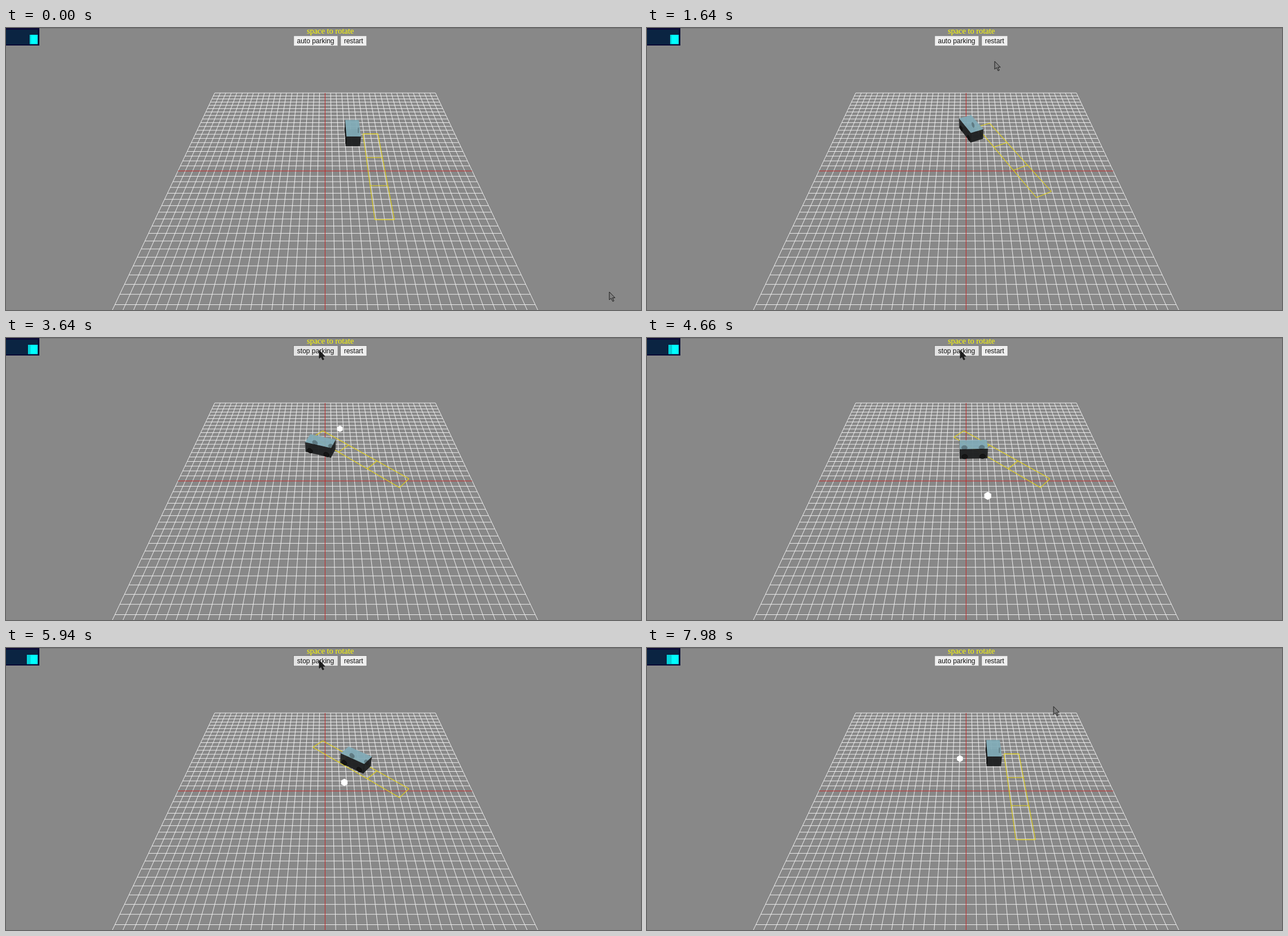
An HTML page that plays this animation: 1123 by 499 pixels, repeating every 8000 ms.

```html
<!DOCTYPE html>
<html lang="en">
<head>
<meta charset="utf-8">
<title>Parking simulation</title>
<style>
html, body { margin: 0; width: 100%; height: 100%; overflow: hidden; background: #888; }
svg { display: block; width: 100%; height: 100%; }
.title { font: 14.4px "Liberation Serif", "Times New Roman", serif; fill: #ff0; }
.label { font: 12px "Liberation Sans", Arial, sans-serif; fill: #111; }
.title, .label { text-anchor: middle; }
</style>
</head>
<body>
<svg viewBox="0 0 1123 499">
  <rect width="1123" height="499" fill="#888"/>
  <rect width="1123" height="1" fill="#747474"/>
  <path id="grid" fill="none" stroke="#eee"/>
  <path id="axes" fill="none" stroke="#c62424"/>
  <path id="slots" fill="none" stroke="#e6d414" stroke-width="1.1"/>
  <g id="car">
    <path id="floor" fill="#222" opacity=".6"/>
    <path id="sides" fill="#202223" stroke="#161616" stroke-width=".5" opacity=".93"/>
    <path id="roof" fill="#80abb7" opacity=".93"/>
    <path id="farWheels" fill="#111" stroke="#111" opacity=".3"/>
    <path id="nearWheels" fill="#141414" stroke="#0a0a0a" opacity=".9"/>
  </g>
  <path id="ball" fill="#fff"/>
  <rect width="59" height="31" fill="#0a0a35"/>
  <rect y="3" width="56" height="26" fill="#0b2442"/>
  <rect id="bars" y="12" height="16.5" fill="#0ff"/>
  <path id="stripes" stroke="#0b6f86" opacity=".6"/>
  <text class="title" x="573.5" y="10">space to rotate</text>
  <rect id="parkBox" stroke="#777"/>
  <text id="parkText" class="label" x="547.5" y="27.3"></text>
  <rect id="restartBox" stroke="#777"/>
  <text class="label" x="614.7" y="27.3">restart</text>
  <path id="cursor" d="M0 0V14L3.2 11.2L6 16.8L8.2 15.8L5.6 10.4H10Z" stroke="#1c1c1c" stroke-linejoin="round"/>
</svg>
<script>
const $ = id => document.getElementById(id);
const LOOP = 8000, RAD = Math.PI / 180, DIAG = Math.SQRT1_2;
const sin = deg => Math.sin(deg * RAD), cos = deg => Math.cos(deg * RAD);
const clamp = (v, lo = 0, hi = 1) => Math.min(hi, Math.max(lo, v));
const span = (t, from, to) => clamp((t - from) / (to - from));

// Camera at (0, 30, 30) looking at the origin
const depth = (y, z) => 42.43 - (y + z) * DIAG;
function project(x, y, z) {
  const k = 552 / depth(y, z);
  return [564.3 + x * k, 253 - (y - z) * DIAG * k];
}
const join = pts => "M" + pts.map(p => p.map(v => v.toFixed(2)).join(" ")).join("L");
const line = (x1, z1, x2, z2) => join([project(x1, 0, z1), project(x2, 0, z2)]);

function drawGrid() {
  let grid = "";
  for (let i = -20; i <= 20; i++) {
    if (i) grid += line(i, -20, i, 20) + line(-20, i, 20, i);
  }
  $("grid").setAttribute("d", grid);
  $("axes").setAttribute("d", line(0, -20, 0, 20) + line(-20, 0, 20, 0));
}

function drawSlots(turn) {
  const at = (x, z) => [x * cos(turn) + z * sin(turn), z * cos(turn) - x * sin(turn)];
  const seg = (a, b, c, d) => line(...at(a, b), ...at(c, d));
  let d = seg(5.85, -8.1, 5.85, 8.1) + seg(8.15, -8.1, 8.15, 8.1);
  for (const z of [-8.1, -2.7, 2.7, 8.1]) d += seg(5.85, z, 8.15, z);
  $("slots").setAttribute("d", d);
}

// Rear axle position and direction of reverse travel
const AXLE = 1.4, RADIUS = 5, SWEEP = 44.5, TURN = 47;
function startPose(turn) {
  const a = -60.1 - 0.95 * turn, dir = 90 - turn;
  return { x: 8.22 * cos(a) + AXLE * cos(dir), z: 8.22 * sin(a) + AXLE * sin(dir), dir };
}
const pivot = (p, r) => [p.x - r * sin(p.dir), p.z + r * cos(p.dir)];
function drive(p, r, angle) {
  const [cx, cz] = pivot(p, r), dir = p.dir + Math.sign(r) * angle;
  return { x: cx + r * sin(dir), z: cz - r * cos(dir), dir };
}
function carPose(t, turn) {
  let p = startPose(turn);
  if (turn < TURN) return p;
  p = drive(p, -RADIUS, SWEEP * span(t, 3075, 4165));
  return drive(p, RADIUS, SWEEP * span(t, 5000, 6090));
}

function drawCar(p) {
  const W = 1.03, L = 2, H = 1.86;
  const cx = p.x - AXLE * cos(p.dir), cz = p.z - AXLE * sin(p.dir);
  const ground = (a, b) => [cx + a * cos(p.dir) - b * sin(p.dir), cz + a * sin(p.dir) + b * cos(p.dir)];
  const pt = (a, b, y) => { const [x, z] = ground(a, b); return project(x, y, z); };
  const seen = (a, b) => {
    const [x, z] = ground(a, b);
    return (x - cx) * -x + (z - cz) * (30 - z) > 0;
  };
  const slab = y => join([pt(-L, -W, y), pt(L, -W, y), pt(L, W, y), pt(-L, W, y)]) + "Z";
  const wall = (a1, b1, a2, b2) =>
    join([pt(a1, b1, 0.08), pt(a2, b2, 0.08), pt(a2, b2, H), pt(a1, b1, H)]) + "Z";
  let sides = "", near = "", far = "";
  for (const s of [-1, 1]) {
    if (seen(s * L, 0)) sides += wall(s * L, -W, s * L, W);
    const open = seen(0, s * W);
    if (open) sides += wall(-L, s * W, L, s * W);
    for (const a of [-1.3, 1.3]) {
      const rim = Array.from({ length: 16 }, (_, i) =>
        pt(a + 0.42 * cos(i * 22.5), s * W, 0.44 + 0.42 * sin(i * 22.5)));
      if (open) near += join(rim) + "Z"; else far += join(rim) + "Z";
    }
  }
  $("floor").setAttribute("d", slab(0.1));
  $("sides").setAttribute("d", sides);
  $("roof").setAttribute("d", slab(H));
  $("nearWheels").setAttribute("d", near);
  $("farWheels").setAttribute("d", far);
}

// White marker on the turning centre; it lies at infinity while the wheels are straight
function drawBall(t, pose) {
  const rate = 0.00062;
  const bend = t < 4165 ? -clamp((t - 2535) * rate, 0, 0.2) : clamp((t - 4165) * rate - 0.2, -0.2, 0.2);
  let d = "";
  if (Math.abs(bend) > 0.032) {
    const [x, z] = pivot(pose, 1 / bend);
    if (depth(1, z) > 5) {
      const [sx, sy] = project(x, 1, z), r = 276 / depth(1, z);
      d = join(Array.from({ length: 6 }, (_, i) => [sx + r * sin(i * 60), sy - r * cos(i * 60)])) + "Z";
    }
  }
  $("ball").setAttribute("d", d);
}

// time, x, y
const PATH = [
  [60, 1067, 467], [360, 960, 358], [430, 971, 369], [860, 971, 369], [1640, 615, 59],
  [2280, 554, 22], [6400, 554, 22], [7080, 624, 28], [7240, 624, 28], [7980, 719, 103.5]
];
function cursorAt(t) {
  const i = PATH.findIndex(k => k[0] >= t);
  if (i === 0) return PATH[0].slice(1);
  if (i < 0) return PATH[PATH.length - 1].slice(1);
  const [t0, x0, y0] = PATH[i - 1], [t1, x1, y1] = PATH[i], u = span(t, t0, t1);
  return [x0 + (x1 - x0) * u, y0 + (y1 - y0) * u];
}

function drawButton(id, x, w, hover, edged) {
  const grow = edged ? 0.5 : 0, el = $(id);
  const set = { x: x - grow, y: 14 - grow, width: w + 2 * grow, height: 17.5 + 2 * grow,
    fill: hover ? "#e3e3e3" : "#efefef", "stroke-width": edged ? 1 : 0.4 };
  for (const k in set) el.setAttribute(k, set[k]);
}

function drawPanel(t) {
  const n = Math.floor(t / 1000), left = 42 - n;
  $("bars").setAttribute("x", left);
  $("bars").setAttribute("width", 56 - left);
  let d = "";
  for (let i = 0; i <= n; i += 2) d += `M${left + 1.5 + i} 12V28.5`;
  $("stripes").setAttribute("d", d);
}

function render(t) {
  const reset = t >= 7250;
  const turn = reset ? 0 : TURN * span(t, 890, 2245);
  const pose = carPose(t, turn);
  drawSlots(turn);
  drawCar(pose);
  drawBall(t, pose);
  drawPanel(t);

  const [x, y] = cursorAt(t), inRow = y > 14 && y < 32;
  const onPark = inRow && x > 509 && x < 587, onRestart = inRow && x > 592 && x < 638;
  const edged = onPark || onRestart;
  drawButton("parkBox", 509, 77.6, onPark, edged);
  drawButton("restartBox", 592, 45.6, onRestart, edged);
  $("parkText").textContent = t >= 2400 && t < 6090 ? "stop parking" : "auto parking";
  $("cursor").setAttribute("transform", `translate(${x} ${y})`);
  $("cursor").setAttribute("fill", edged ? "#1c1c1c" : "#808080");
}

drawGrid();
const start = performance.now();
function tick(now) {
  render(Math.max(0, now - start) % LOOP);
  requestAnimationFrame(tick);
}
render(0);
requestAnimationFrame(tick);
</script>
</body>
</html>
```
